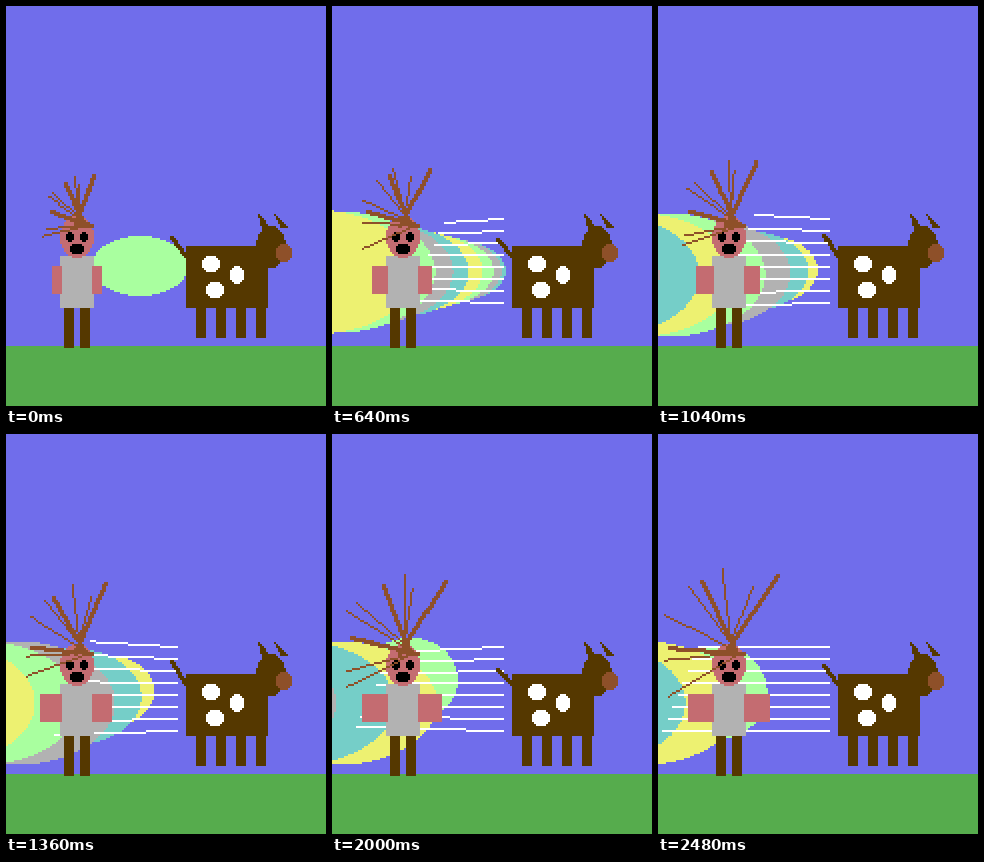
Write an HTML page with a canvas that moves like this. It is 320 px wide and 400 px high and loops after 2560 ms.

```html
<!DOCTYPE html>
<html lang="en">
<head>
<meta charset="utf-8">
<title>Windy cow</title>
<style>
html, body { margin: 0; width: 100%; height: 100%; overflow: hidden; background: #706deb; }
canvas { display: block; width: 320px; height: 400px; image-rendering: pixelated; }
</style>
</head>
<body>
<canvas id="stage" width="160" height="200"></canvas>
<script>
const ctx = document.getElementById('stage').getContext('2d');
const STEP = 80, STEPS = 32;
const SKY = '#706deb', GRASS = '#56ac4d', BROWN = '#553800', RUST = '#8e5029',
      SKIN = '#c46c71', GREY = '#b2b2b2', WHITE = '#ffffff', BLACK = '#000000';
const GAS = ['#a9ff9f', '#edf171', '#75cec8', GREY];
const STRANDS = 9;

const mix = (a, b, f) => a + (b - a) * f;
const after = (n, start) => Math.max(0, n - start);

function noise(i) {
  const v = Math.sin((i + 1) * 12.9898) * 43758.5453;
  return v - Math.floor(v);
}

function rect(x, y, w, h, color) {
  ctx.fillStyle = color;
  ctx.fillRect(x, y, w, h);
}

function ellipse(cx, cy, rx, ry, color) {
  for (let y = Math.floor(cy - ry); y < cy + ry; y++) {
    const k = (y + 0.5 - cy) / ry;
    if (k * k >= 1) continue;
    const half = rx * Math.sqrt(1 - k * k);
    const left = Math.round(cx - half);
    rect(left, y, Math.round(cx + half) - left, 1, color);
  }
}

function line(x0, y0, x1, y1, w, color) {
  const n = Math.ceil(Math.max(Math.abs(x1 - x0), Math.abs(y1 - y0), 1));
  for (let i = 0; i <= n; i++) {
    rect(Math.round(mix(x0, x1, i / n)), Math.round(mix(y0, y1, i / n)), w, w, color);
  }
}

// Nested puffs: each inner one is larger and further left
function drawCloud(n) {
  const count = Math.min(8, Math.floor(1 + 1.5 * n));
  const right = 91 - 1.4 * after(n, 5);
  const spread = 1.5 + 0.5 * after(n, 7);
  const tipY = 130 + 0.3 * n * Math.sin(0.2 * n);
  const bigY = Math.min(134.5, 125 + n);
  const small = 15 + 0.35 * after(n, 8);
  // The colours slip outwards by one full cycle, fastest early on
  const shift = Math.floor(4.2 * n ** 3 / (n ** 3 + 512));
  for (let j = 0; j < count; j++) {
    const gap = spread * j ** 1.6;
    const rx = Math.min(50, 24 + 0.1 * n * gap);
    const ry = Math.min(31, small + 0.055 * n * gap);
    const cy = mix(tipY, bigY, (ry - small) / (31 - small));
    ellipse(right - gap - rx, cy, rx, ry, GAS[(j + 8 - shift) % 4]);
  }
}

function drawWind(n, sway) {
  if (!n) return;
  for (let i = 0; i < 8; i++) {
    const dy = 6 * i - 24;
    const left = Math.max(0, 68 - 1.55 * n - 2.5 * i);
    line(left, 130 + dy * (1 - 0.12 * sway), 85, 130 + dy, 1, WHITE);
  }
}

function drawCow(sway) {
  line(82, 115 + 2 * sway, 89, 124, 2, BROWN);
  rect(90, 120, 41, 31, BROWN);
  for (let x = 95; x <= 125; x += 10) rect(x, 151, 5, 15, BROWN);
  ellipse(132.5, 120.5, 7.5, 10.5, BROWN);
  for (let x = 128; x <= 132; x++) line(126, 104, x, 111, 1, BROWN);
  for (let x = 137; x <= 140; x++) line(134, 104, x, 110, 1, BROWN);
  ellipse(139, 123.5, 4, 5, RUST);
  ellipse(102.5, 129, 4.5, 4, WHITE);
  ellipse(115.5, 134.5, 3.5, 4.5, WHITE);
  ellipse(104.5, 142, 4.5, 4, WHITE);
}

function drawMan(n) {
  rect(29, 150, 5, 21, BROWN);
  rect(37, 150, 5, 21, BROWN);
  rect(27, 125, 17, 26, GREY);
  const left = 23 - Math.min(8, Math.ceil(0.3 * n));
  rect(left, 130, 28 - left, 14, SKIN);
  rect(43, 130, 5 + Math.min(8, Math.floor(0.3 * n)), 14, SKIN);
  ellipse(35.5, 115.5, 8.5, 10.5, SKIN);
  ellipse(32, 115.5, 2, 2.5, BLACK);
  ellipse(39, 115.5, 2, 2.5, BLACK);
  ellipse(35.5, 121.5, 3.5, 2.5, BLACK);
}

// A fan of strands that grows, opens and trembles
function drawHair(n) {
  for (let i = 0; i < STRANDS; i++) {
    const fan = mix(70 - 0.5 * n, 195 + 0.5 * n, i / (STRANDS - 1));
    const angle = (fan + 6 * Math.sin(0.5 * n + 2 * i)) * Math.PI / 180;
    const length = (25 + 0.6 * n) * (0.8 + 0.3 * noise(i));
    const x = 36 - 6 * Math.cos(angle), y = 109;
    line(x, y, x + length * Math.cos(angle), y - length * Math.sin(angle), i % 3 ? 1 : 2, RUST);
  }
}

function draw(n) {
  const sway = Math.sin(0.3 * n);
  rect(0, 0, 160, 170, SKY);
  rect(0, 170, 160, 30, GRASS);
  drawCloud(n);
  drawWind(n, sway);
  drawCow(sway);
  drawMan(n);
  drawHair(n);
}

let shown = -1;
function tick() {
  const n = Math.floor(performance.now() / STEP) % STEPS;
  if (n !== shown) draw(shown = n);
  requestAnimationFrame(tick);
}
tick();
</script>
</body>
</html>
```
